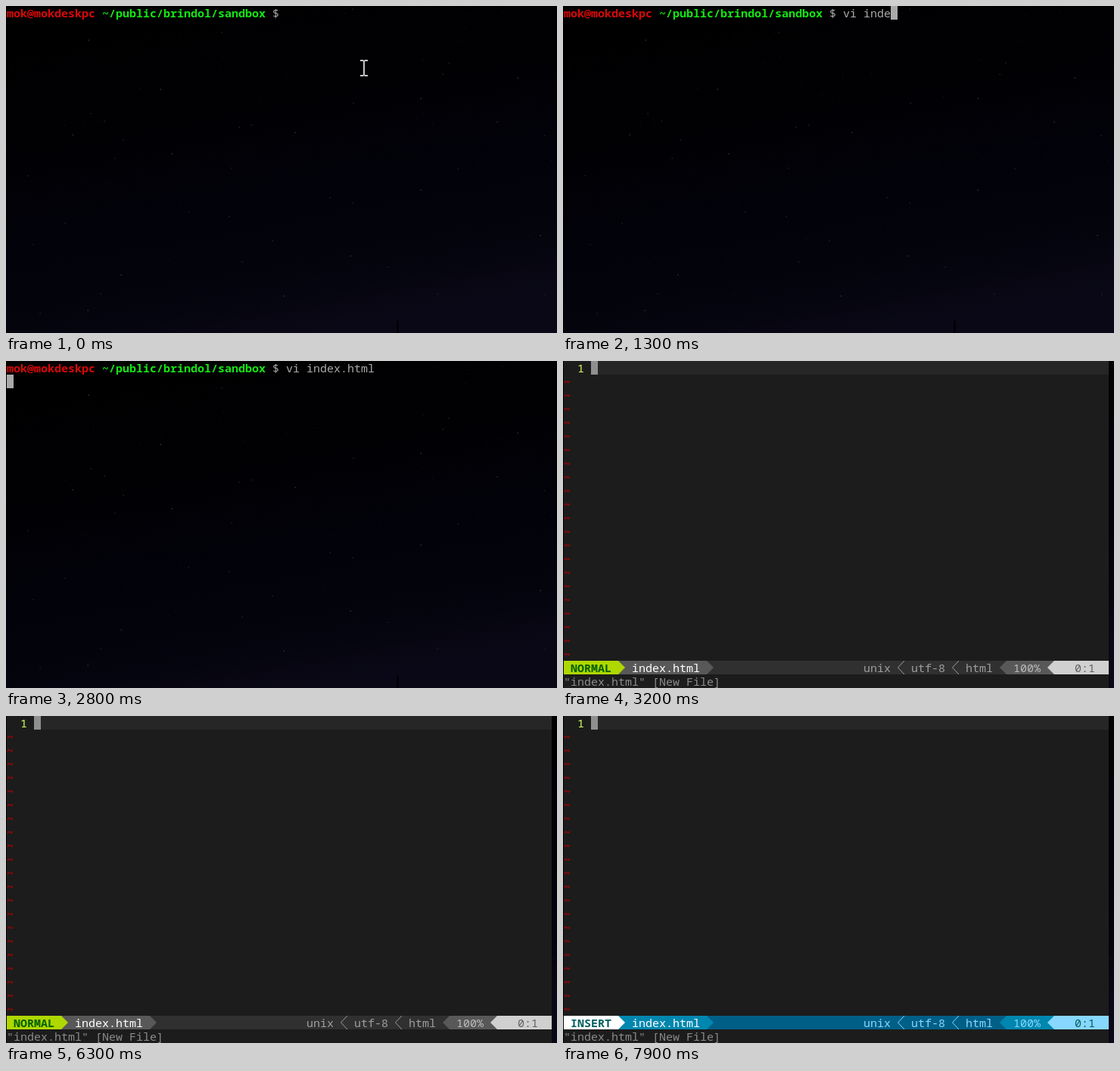
Recreate the animation shown at these times as an HTML page. Size 728 by 432 pixels, loop 8 s.

```html
<!DOCTYPE html>
<html lang="en">
<head>
<meta charset="utf-8">
<title>Terminal session</title>
<style>
html, body { margin: 0; width: 100%; height: 100%; overflow: hidden; background: #000; }
svg { display: block; width: 728px; height: 432px; }
text { font: 15px "Noto Sans Mono", "DejaVu Sans Mono", monospace; white-space: pre; }
.bold { font-weight: 700; }
</style>
</head>
<body>
<svg id="stage" viewBox="0 0 728 432" xmlns="http://www.w3.org/2000/svg">
  <defs>
    <linearGradient id="sky" gradientUnits="userSpaceOnUse" x1="320" y1="0" x2="400" y2="432">
      <stop offset="0" stop-color="#000001"/>
      <stop offset=".3" stop-color="#010104"/>
      <stop offset=".65" stop-color="#02020b"/>
      <stop offset=".88" stop-color="#05050f"/>
      <stop offset="1" stop-color="#0a0816"/>
    </linearGradient>
  </defs>
  <rect width="728" height="432" fill="url(#sky)"/>
  <rect x="516" y="416" width="3" height="16" fill="#020206"/>
</svg>
<script>
const LOOP = 8000, CW = 9, CH = 18;
const stage = document.getElementById('stage');
const colX = col => 1 + col * CW;

function add(parent, tag, attrs = {}) {
  const el = document.createElementNS(stage.namespaceURI, tag);
  for (const key in attrs) el.setAttribute(key, attrs[key]);
  return parent.appendChild(el);
}
const group = parent => add(parent, 'g');
const box = (parent, x, y, width, height, fill) =>
  add(parent, 'rect', { x, y, width, height, fill });
const path = (parent, d, fill, stroke = 'none') => add(parent, 'path', { d, fill, stroke });

function write(parent, col, row, str, fill, bold) {
  const el = add(parent, 'text', { x: colX(col), y: row * CH + 15, fill });
  if (bold) el.setAttribute('class', 'bold');
  el.textContent = str;
  return el;
}

// Hold each value from its time until the next one.
function hold(el, prop, steps) {
  const frames = steps.map(([time, value]) =>
    ({ offset: time / LOOP, [prop]: value, easing: 'step-end' }));
  frames.push({ offset: 1, [prop]: steps[steps.length - 1][1] });
  el.animate(frames, { duration: LOOP, iterations: Infinity });
}
// Visibility flips at each given time.
function toggle(el, first, ...times) {
  hold(el, 'opacity', [0, ...times].map((t, i) => [t, (first + i) % 2]));
}

// Stars
const bright = [109,45, 285,35, 458,4, 204,110, 130,152, 155,177, 88,170, 112,142, 459,128,
  382,167, 308,160, 324,157, 649,153, 585,75, 577,90, 548,122, 144,201, 29,224, 219,195,
  36,315, 78,287, 152,355, 312,338, 352,310, 367,383, 295,278, 505,345, 706,303, 711,171,
  712,381, 108,402, 45,406, 570,380, 676,95, 458,260, 125,380, 455,330, 298,214, 428,253,
  548,243, 241,272, 597,215];
const sky = group(stage);
for (let i = 0; i < bright.length; i += 2)
  box(sky, bright[i] - 0.5, bright[i + 1] - 0.5, 1.5, 1.5, i % 3 ? '#1c2226' : '#2b3335');
let seed = 11;
const rand = () => (seed = seed * 16807 % 2147483647) / 2147483647;
for (let i = 0; i < 110; i++)
  box(sky, Math.floor(rand() * 728), Math.floor(rand() * 415), 1, 1, '#11151b');

// Shell
const shell = group(stage);
const grey = '#aaaaaa';
write(shell, 0, 0, 'mok@mokdeskpc', '#d90808', true);
write(shell, 14, 0, '~/public/brindol/sandbox', '#14e614', true);
write(shell, 39, 0, '$', grey);

const keys = [[600, 'v'], [700, 'i'], [800, ' '], [1000, 'i'], [1100, 'n'], [1200, 'd'],
  [1300, 'e'], [1700, 'x'], [1900, '.'], [2500, 'ht'], [2600, 'ml']];
const at = (col, row) => `translate(${colX(col)}px, ${row * CH}px)`;
const moves = [[0, at(41, 0)]];
let col = 41;
for (const [time, str] of keys) {
  toggle(write(shell, col, 0, str, grey), 0, time);
  col += str.length;
  moves.push([time, at(col, 0)]);
}
moves.push([2800, at(0, 1)]);
const caret = box(shell, 0, 0, CW, CH, grey);
hold(caret, 'transform', moves);
toggle(caret, 0, 400);

const pointer = path(shell, 'M468 71h4l1 1l1-1h4v2h-4v18h4v2h-4l-1-1l-1 1h-4v-2h4v-18h-4z', '#c4c4c4');
toggle(pointer, 1, 600);
toggle(shell, 1, 3200);

// Editor
const editor = group(stage);
box(editor, 1, 0, 720, 432, '#1c1c1c');
box(editor, 37, 0, 684, CH, '#262626');
write(editor, 2, 0, '1', '#d7ff5f');
for (let row = 1; row <= 21; row++) write(editor, 0, row, '~', '#b80000', true);
write(editor, 0, 23, '"index.html" [New File]', '#8a8a8a');
toggle(write(editor, 69, 23, '!', '#9e9e9e'), 0, 5000, 6300);
toggle(box(editor, 37, 0, CW, CH, '#8f8f8f'), 1, 3900, 4300, 5600, 6100, 7400, 7500);

function statusLine(label, c) {
  const g = group(editor), y = 22 * CH;
  const right = (n, fill) => path(g, `M${colX(n)} ${y}l9 9l-9 9z`, fill);
  const left = (n, fill) => path(g, `M${colX(n + 1)} ${y}l-9 9l9 9z`, fill);
  const thin = n => path(g, `M${colX(n + 1)} ${y}l-8.5 9l8.5 9`, 'none', c.text);
  box(g, 1, y, 720, CH, c.bar);
  box(g, 1, y, 72, CH, c.mode);
  box(g, 73, y, 117, CH, c.file);
  right(8, c.mode);
  right(21, c.file);
  thin(49);
  thin(57);
  left(64, c.file);
  box(g, 586, y, 63, CH, c.file);
  left(71, c.pos);
  box(g, 649, y, 72, CH, c.pos);
  write(g, 1, 22, label, c.modeText, true);
  write(g, 10, 22, 'index.html', '#ffffff');
  write(g, 44, 22, 'unix', c.text);
  write(g, 51, 22, 'utf-8', c.text);
  write(g, 59, 22, 'html', c.text);
  write(g, 66, 22, '100%', c.percent);
  write(g, 75, 22, '0:1', c.posText);
  return g;
}
toggle(statusLine('NORMAL', {
  bar: '#303030', mode: '#afd700', modeText: '#005f00', file: '#585858',
  text: '#9e9e9e', percent: '#bcbcbc', pos: '#d0d0d0', posText: '#606060'
}), 1, 7900);
toggle(statusLine('INSERT', {
  bar: '#005f87', mode: '#ffffff', modeText: '#005f5f', file: '#0087af',
  text: '#87d7ff', percent: '#87d7ff', pos: '#87d7ff', posText: '#005f5f'
}), 0, 7900);
toggle(editor, 0, 3200);
</script>
</body>
</html>
```
